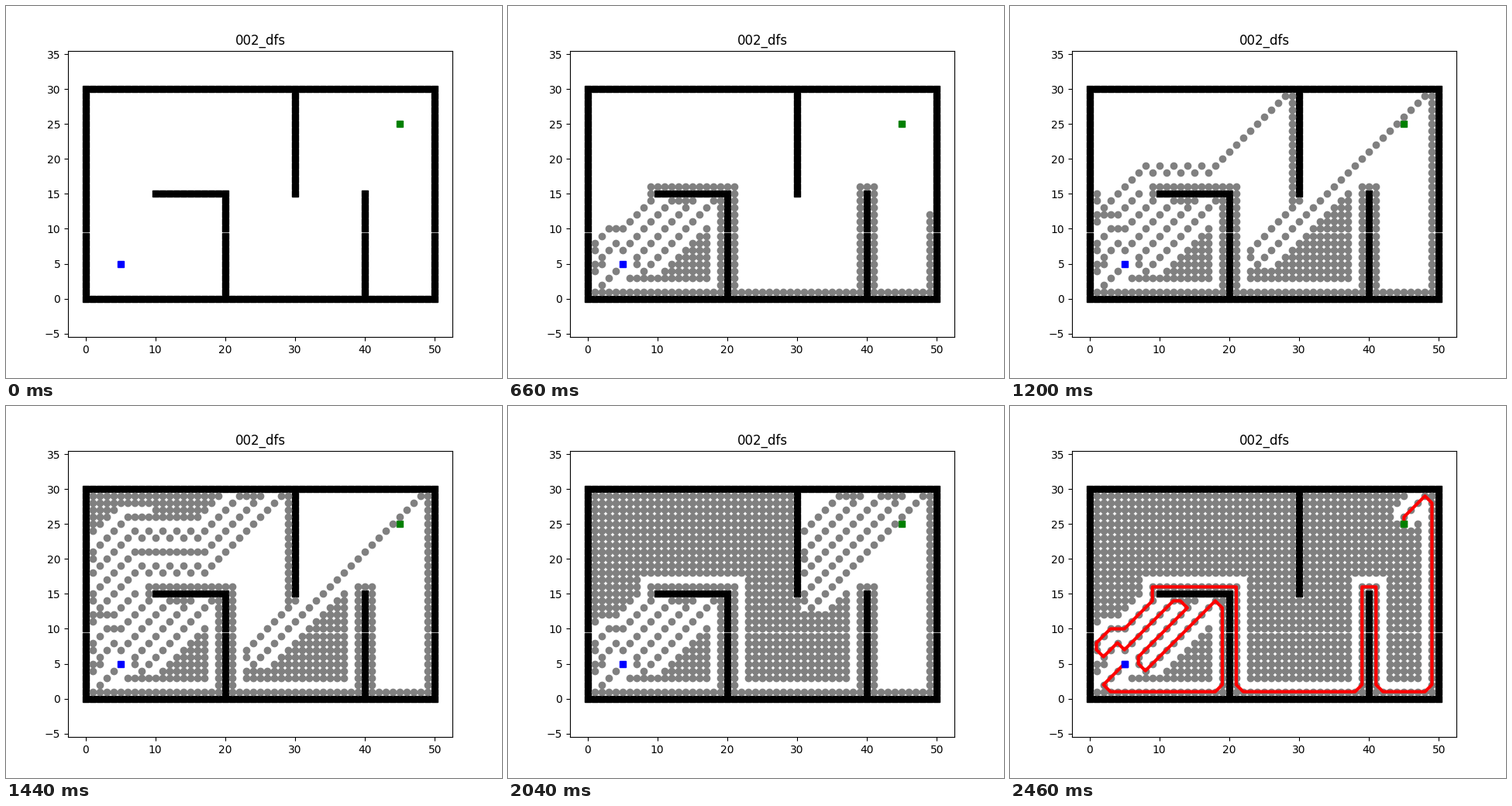
A matplotlib script that plays this animation: 640x480 px, repeating every 2520 ms.

```python
import matplotlib.pyplot as plt
from matplotlib.animation import FuncAnimation

W, H = 51, 31
START, GOAL = (5, 5), (45, 25)
MOVES = [(-1, 0), (-1, 1), (0, 1), (1, 1),
         (1, 0), (1, -1), (0, -1), (-1, -1)]
FRAMES, INTERVAL = 42, 60


def build_walls():
    walls = {(x, y) for x in range(W) for y in (0, H - 1)}
    walls |= {(x, y) for x in (0, W - 1) for y in range(H)}
    walls |= {(x, 15) for x in range(10, 21)}
    walls |= {(20, y) for y in range(15)}
    walls |= {(30, y) for y in range(15, 30)}
    walls |= {(40, y) for y in range(16)}
    return walls


def neighbours(cell, walls):
    """Free cells around a cell; diagonal steps may not cut a wall corner."""
    x, y = cell
    for dx, dy in MOVES:
        if not {(x + dx, y + dy), (x + dx, y), (x, y + dy)} & walls:
            yield x + dx, y + dy


def depth_first(walls):
    parent, stack, visited = {START: START}, [START], []
    while stack:
        cell = stack.pop()
        if cell == GOAL:
            break
        visited.append(cell)
        for nxt in neighbours(cell, walls):
            if nxt not in parent:
                parent[nxt] = cell
                stack.append(nxt)
    path = [GOAL]
    while path[-1] != START:
        path.append(parent[path[-1]])
    return visited[1:], path


def dot_counts(total):
    """Dots on show per frame: steps of 20, then 30, then 40."""
    counts = [0]
    for n in range(1, total + 1):
        step = 20 if n < total / 3 else 30 if n < total * 2 / 3 else 40
        if n % step == 0:
            counts.append(n)
    return counts


walls = build_walls()
visited, path = depth_first(walls)
counts = dot_counts(len(visited))

fig, ax = plt.subplots(figsize=(6.4, 4.8), dpi=100)


def plot_ends():
    return ax.plot(*START, "bs") + ax.plot(*GOAL, "gs")


plot_ends()
ax.plot(*zip(*sorted(walls)), "sk")
ax.set_title("002_dfs")
ax.axis("equal")
dots, = ax.plot([], [], color="gray", marker="o", linestyle="none")
route = ax.plot(*zip(*path), linewidth=3, color="r") + plot_ends()


def draw(i):
    n = counts[i] if i < min(len(counts), FRAMES - 2) else len(visited)
    dots.set_data([c[0] for c in visited[:n]], [c[1] for c in visited[:n]])
    for artist in route:
        artist.set_visible(i == FRAMES - 1)
    return [dots, *route]


anim = FuncAnimation(fig, draw, frames=FRAMES, interval=INTERVAL,
                     init_func=lambda: draw(0), repeat=True)
plt.show()
```
